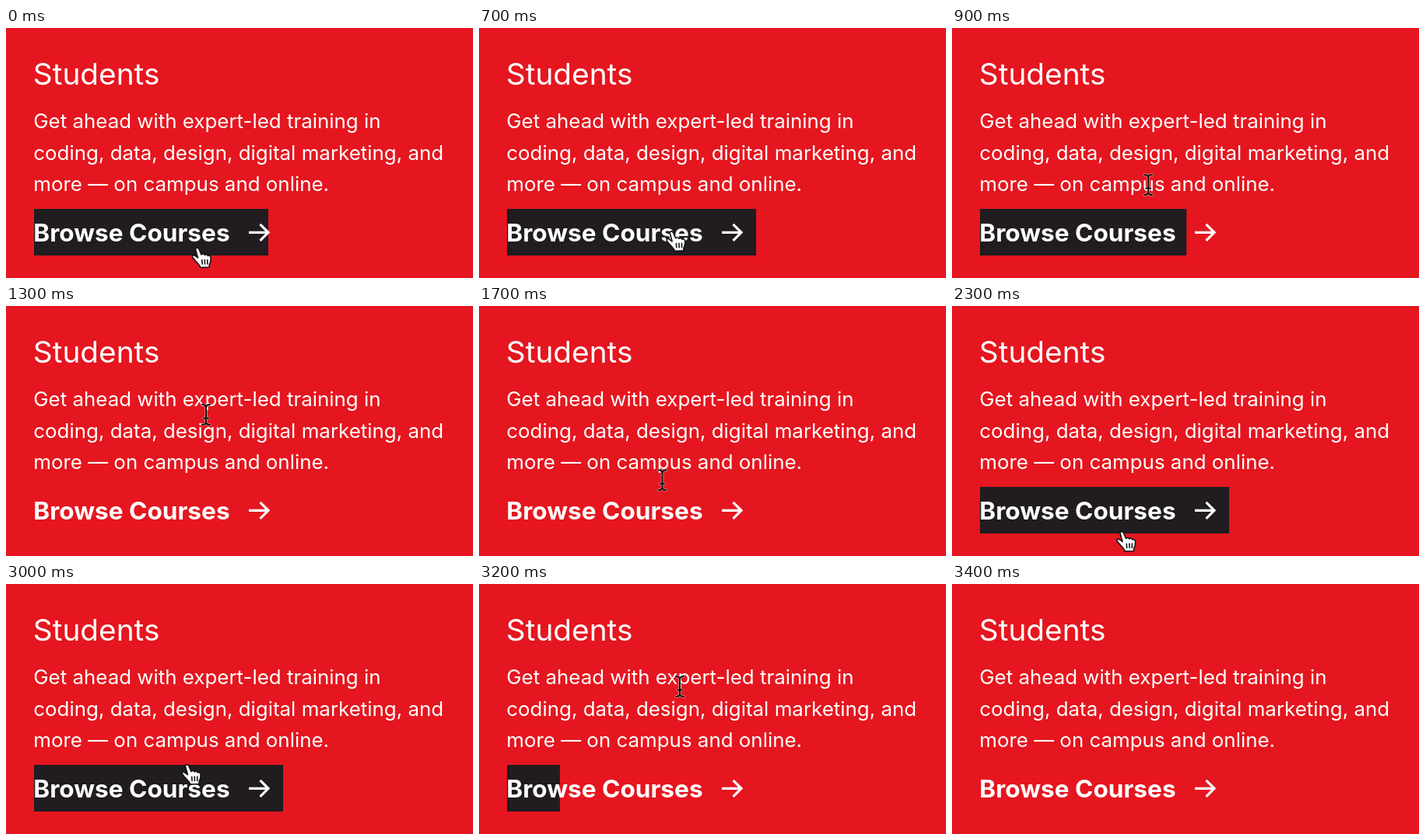
These frames come from a looping animation (600 px wide and 322 px high, 3.5 s). An HTML page:

```html
<!DOCTYPE html>
<html lang="en">
<head>
<meta charset="utf-8">
<title>Course button</title>
<style>
  html, body { margin: 0; width: 100%; height: 100%; overflow: hidden; background: #e5161f; }
  svg { display: block; width: 600px; height: 322px; }
  text { font-family: Inter, "Open Sans", sans-serif; font-optical-sizing: none; fill: #fff; }
  .title { font-size: 38.8px; font-weight: 430; }
  .body { font-size: 25.9px; font-weight: 430; }
  .link { font-size: 31.6px; font-weight: 750; }
  .arrow { fill: none; stroke: #fff; stroke-width: 3.2; }
  .hand { fill: #fff; stroke: #111; stroke-width: 1.6; stroke-linejoin: round; stroke-linecap: round; }
  .beam { fill: none; stroke-linecap: round; }
</style>
</head>
<body>
<svg viewBox="0 0 600 322">
  <defs>
    <path id="beamShape" d="M-5 -13Q0 -13 0 -9Q0 -13 5 -13M0 -9V9M-5 13Q0 13 0 9Q0 13 5 13M-3 4.5H3"/>
  </defs>
  <rect id="fill" x="36" y="233" width="0" height="60" fill="#201c20"/>
  <text class="title" x="34.8" y="73.2">Students</text>
  <g class="body">
    <text x="35.3" y="129">Get ahead with expert-led training in</text>
    <text x="35.3" y="169.5">coding, data, design, digital marketing, and</text>
    <text x="35.3" y="210">more — on campus and online.</text>
  </g>
  <text class="link" x="35.3" y="274.7">Browse Courses</text>
  <path class="arrow" d="M312 263.3H336M326.5 252.8L337 263.3L326.5 273.8"/>
  <g id="cursor">
    <g id="hand" class="hand">
      <path d="M-2.6 1.2C-2 -.8 .8 -1 1.8 1L5 8.5C5.6 7 9 7 9.2 9C10 7.6 13 8 13.2 10C14.2 9 16.8 9.6 17 12C17.6 15.5 16.8 18 15.5 20.5L15 24.5L4 25C3 22 -.5 19 -3 16C-5 13.5 -7.5 11.5 -6.5 9.8C-5.5 8.3 -3 9.6 .5 12.5Z"/>
      <path fill="none" d="M5.8 15.2L6.2 20.5M9.3 15L9.6 20.5M12.8 15L12.9 20.5"/>
    </g>
    <g id="beam" class="beam">
      <use href="#beamShape" stroke="#fff" stroke-opacity=".5" stroke-width="3.6"/>
      <use href="#beamShape" stroke="#111" stroke-width="2"/>
    </g>
  </g>
</svg>
<script>
  const LOOP = 3500, STEP = 100, FULL = 320, FADE = 350;
  const $ = id => document.getElementById(id);
  const clamp = k => Math.min(1, Math.max(0, k));
  const smooth = k => k * k * (3 - 2 * k);
  const speedUp = k => k ** 3;

  // The cursor rests on the button, rises to the text, returns, then flies off the top
  const rest = { x: 246, y: 283.5 };
  const moves = [
    { from: 540, to: 1200, dx: 11, dy: -143.5, curve: smooth },
    { from: 1350, to: 2000, dx: -38.5, dy: 151, curve: smooth },
    { from: 2500, to: 3400, dx: 84, dy: -338, curve: speedUp }
  ];

  // When the pointer enters and leaves the button
  const hovers = [[-245, 850], [1755, 3030]];

  function place(t) {
    let { x, y } = rest;
    for (const { from, to, dx, dy, curve } of moves) {
      const k = curve(clamp((t - from) / (to - from)));
      x += dx * k;
      y += dy * k;
    }
    return { x, y };
  }

  // The CSS "ease" curve: find s where its x is k, return its y
  function ease(k) {
    let lo = 0, hi = 1;
    for (let i = 0; i < 20; i++) {
      const s = (lo + hi) / 2;
      if (.75 * s * (1 - s) + s ** 3 < k) lo = s; else hi = s;
    }
    return .3 * lo * (1 - lo) ** 2 + 3 * lo * lo * (1 - lo) + lo ** 3;
  }

  const fade = ms => ease(clamp(ms / FADE));
  const filled = t => hovers.reduce(
    (sum, [enter, leave]) => sum + fade(t - enter) - fade(t - leave), 0);

  function draw(now) {
    const t = Math.floor((now % LOOP) / STEP) * STEP;
    const { x, y } = place(t);
    const over = hovers.some(([enter, leave]) => t >= enter && t < leave);
    $("fill").setAttribute("width", Math.max(0, filled(t) * FULL).toFixed(1));
    $("cursor").setAttribute("transform", `translate(${x} ${y})`);
    $("hand").style.display = over ? "" : "none";
    $("beam").style.display = over ? "none" : "";
  }

  const start = performance.now();
  function tick() {
    draw(performance.now() - start);
    requestAnimationFrame(tick);
  }
  tick();
</script>
</body>
</html>
```
